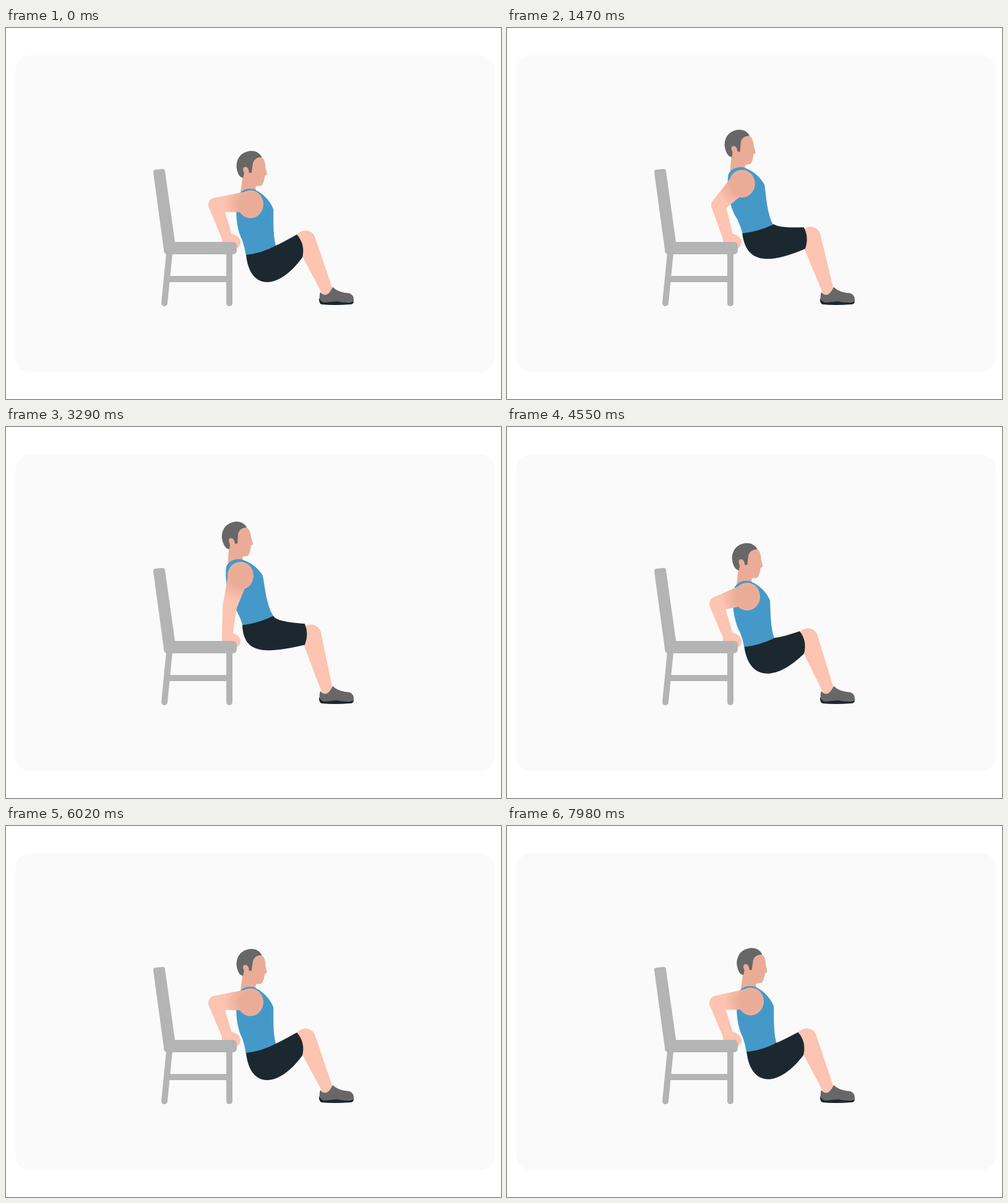
An HTML page with a canvas that plays this animation: 800x600 px, repeating every 8000 ms.

```html
<!DOCTYPE html>
<html lang="en">
<head>
<meta charset="utf-8">
<title>Chair dips</title>
<style>
html, body { margin: 0; width: 100%; height: 100%; overflow: hidden; background: #fff; }
canvas { display: block; }
</style>
</head>
<body>
<canvas id="stage" width="800" height="600"></canvas>
<script>
const ctx = document.getElementById('stage').getContext('2d');
const LOOP = 8000, TICK = 70, REP = 2030, MOVE = 764, RISE = 242, SINK = 1210;
const GREY = '#b4b4b4', DARK = '#1c282f', SHIRT = '#4599c8', HAIR = '#676767';
const SKIN = '#fcc4b1', SHADE = '#eaac97';

const FACE = new Path2D('M358 172L388 162Q394 163 396 178L399 188Q399 191 396 191L395 198Q393 208 390 208L383 209Q381 213 385 220L380 228H358L360 196Z');
const CROWN = new Path2D('M389 162C384 152 372 151 365 154C352 158 348 170 349 180C351 190 355 197 361 197L362 189Q357 180 364 179Q369 180 370 188H374L375 172Q377 163 389 162Z');
const VEST = new Path2D('M383 321Q379 308 373 297C364 285 352 255 356 225Q362 213 378 213C395 217 408 228 415 240C419 262 421 287 432 305L434 311L390 325Z');
const SHOE = new Path2D('M508 427Q519 439 528 419Q537 428 555 429Q563 432 562 442L540 446L509 444Q505 435 508 427Z');
const SOLE = new Path2D('M506 436Q508 443 515 444L535 442Q550 446 562 442Q562 447 556 447Q530 449 510 447Q505 445 506 436Z');
const HAND = new Path2D('M349 336L366 333Q379 337 379 346Q379 355 371 357L349 350Z');
const BACKREST = new Path2D('M242 233L253 232L269 346V358H259Z');

const ease = u => (1 - Math.cos(Math.PI * Math.min(1, Math.max(0, u)))) / 2;

// Depth of the dip: 0 with straight arms, 1 at the lowest point.
function depth(t) {
  const c = t % REP;
  return 1 - ease((c - RISE) / MOVE) + ease((c - SINK) / MOVE);
}

function fill(path, color) {
  ctx.fillStyle = color;
  ctx.fill(path);
}

function line(x1, y1, x2, y2, width) {
  ctx.lineWidth = width;
  ctx.beginPath();
  ctx.moveTo(x1, y1);
  ctx.lineTo(x2, y2);
  ctx.stroke();
}

function box(x, y, w, h, r, color) {
  const path = new Path2D();
  path.roundRect(x, y, w, h, r);
  fill(path, color);
}

// Hull of two circles
function limb(x1, y1, r1, x2, y2, r2, color) {
  const a = Math.atan2(y2 - y1, x2 - x1);
  const b = Math.acos((r1 - r2) / Math.hypot(x2 - x1, y2 - y1));
  const path = new Path2D();
  path.arc(x1, y1, r1, a + b, a - b + 2 * Math.PI);
  path.arc(x2, y2, r2, a - b, a + b);
  path.closePath();
  fill(path, color);
}

// Draws within a frame turned about (x, y) and moved by (dx, dy).
function pose(x, y, dx, dy, degrees, paint) {
  ctx.save();
  ctx.translate(x + dx, y + dy);
  ctx.rotate(degrees * Math.PI / 180);
  ctx.translate(-x, -y);
  paint();
  ctx.restore();
}

function drawChair() {
  ctx.strokeStyle = GREY;
  ctx.lineCap = ctx.lineJoin = 'round';
  line(264, 364, 256, 445, 10);
  line(361, 364, 361, 445, 10);
  line(264, 406, 358, 406, 10);
  ctx.lineWidth = 8;
  ctx.stroke(BACKREST);
  fill(BACKREST, GREY);
  box(255, 346, 118, 20, 6, GREY);
}

function drawTorso(d, sway) {
  pose(370, 172, 24 * d + sway, 46 * d, 4 * d, () => {
    fill(FACE, SHADE);
    fill(CROWN, HAIR);
  });
  pose(383, 320, 5 * d + sway, 47 * d, 9 * d, () => fill(VEST, SHIRT));
}

function drawArm(d, sway) {
  const x = 379 + 16 * d + sway, y = 240 + 45 * d;
  const straight = (1 - d) ** 7;
  const ex = 338.5 + 25 * straight, ey = 286 + 4 * straight;
  const tone = ctx.createRadialGradient(x, y, 18, x, y, 42);
  tone.addColorStop(0, SHADE);
  tone.addColorStop(1, SKIN);
  limb(ex, ey, 11.5, 357.5, 339, 8.5, SKIN);
  limb(ex, ey, 11.5, x - 3, y - 4 * d, 17, tone);
  ctx.beginPath();
  ctx.ellipse(x, y, 21, 22.5, 0, 0, 2 * Math.PI);
  ctx.fill();
  fill(HAND, SKIN);
}

function drawLegs(d, sway) {
  limb(493 - 9 * d, 336 + 8 * d, 16.5, 518, 422.5, 9.5, SKIN);
  const hipX = 382 + 6 * d + sway, hipY = 320 + 47 * d;
  const shorts = new Path2D();
  shorts.moveTo(hipX, hipY);
  shorts.quadraticCurveTo(hipX + 26, hipY - 3, 432 + 4 * d + sway / 2, 305 + 47 * d);
  shorts.quadraticCurveTo(437 + 8 * d, 315 + 33 * d, 483 - 13 * d, 318 + 16 * d);
  shorts.quadraticCurveTo(490 - 6 * d, 334 + 16 * d, 483 - 4 * d, 352 + 19 * d);
  shorts.bezierCurveTo(420 + 20 * d, 366 + 59 * d, 384 + 10 * d, 368 + 57 * d, hipX, hipY);
  fill(shorts, DARK);
  fill(SHOE, HAIR);
  fill(SOLE, DARK);
}

function draw(now) {
  const t = Math.floor(now % LOOP / TICK) * TICK;
  const d = depth(t), sway = 17.2 * (d * d - d);
  ctx.fillStyle = '#fff';
  ctx.fillRect(0, 0, 800, 600);
  box(15, 44, 775, 513, 25, '#fafafa');
  drawTorso(d, sway);
  drawArm(d, sway);
  drawChair();
  drawLegs(d, sway);
  requestAnimationFrame(draw);
}
requestAnimationFrame(draw);
</script>
</body>
</html>
```
